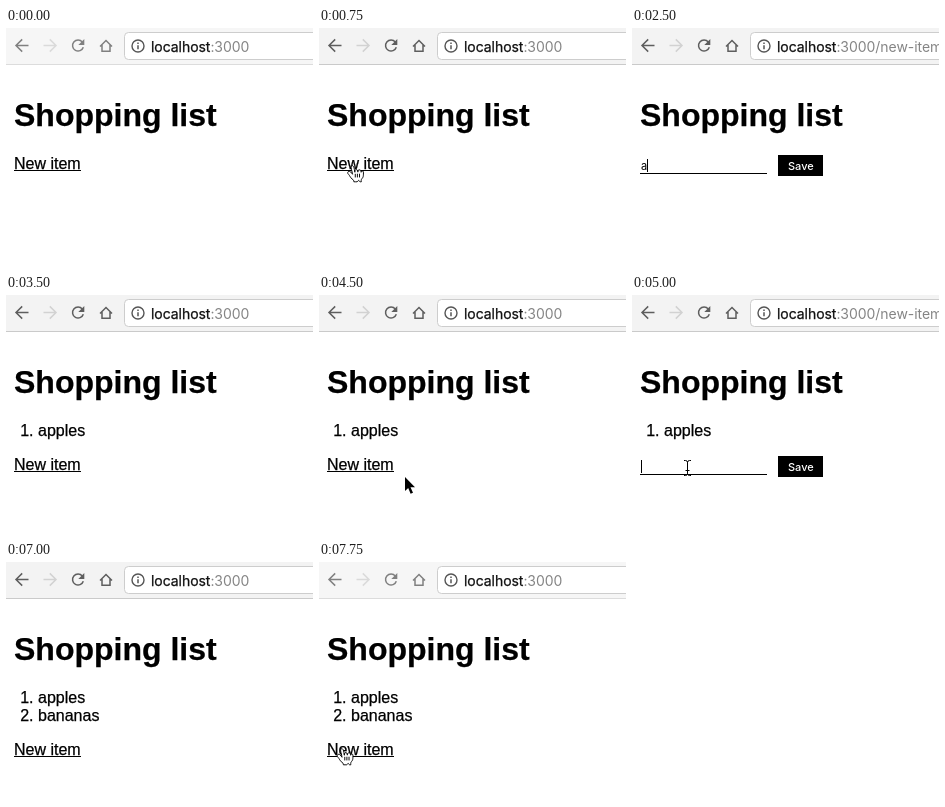
Write an HTML page that moves like this. It is 307 px wide and 239 px high and loops after 8000 ms.

```html
<!DOCTYPE html>
<html lang="en">
<head>
<meta charset="utf-8">
<title>Shopping list</title>
<style>
  html, body { margin: 0; width: 100%; height: 100%; overflow: hidden; background: #fff; }
  svg { display: block; width: 307px; height: 239px; }
  /* the thin stroke gives the heavier look of smoothed text */
  text { font: 16px "Liberation Sans", Arial, sans-serif; white-space: pre; fill: #000; stroke: #000; stroke-width: .25px; }
  .title { font-weight: bold; font-size: 32px; }
  .ui { font: 11px Inter, Roboto, sans-serif; stroke: none; }
  .save { font-weight: 500; fill: #fff; }
  .url { font: 14px Inter, Roboto, sans-serif; letter-spacing: -.05px; fill: #111; stroke: #111; }
  .url .rest { fill: #858585; stroke: none; }
  .bar { fill: #f3f3f3; }
  .edge { fill: #cacaca; }
  .icon { fill: none; stroke: #5e5e5e; stroke-width: 1.5; }
  .icon .solid { fill: #5e5e5e; stroke: none; }
  .icon.off { stroke: #d2d2d2; }
  .idle .bar { fill: #f6f6f6; }
  .idle .edge { fill: #dcdcdc; }
  .idle .icon { stroke: #808080; }
  .idle .icon .solid { fill: #808080; }
  .idle .icon.off { stroke: #dadada; }
  .hide { display: none; }
</style>
</head>
<body>
<svg id="stage" viewBox="0 0 307 239">
  <rect width="307" height="239" fill="#fff"/>

  <rect class="bar" width="307" height="36"/>
  <rect class="edge" y="36" width="307" height="1"/>
  <path class="icon" d="M22.5 17.5H10M16.2 11.4L10 17.5l6.2 6.1"/>
  <path class="icon off" d="M37.5 17.5H50M43.8 11.4L50 17.5l-6.2 6.1"/>
  <g class="icon">
    <path d="M76.3 14A5.5 5.5 0 1 0 77.3 19.2"/>
    <path class="solid" d="M78.3 11v6h-6z"/>
  </g>
  <path class="icon" d="M94 18.5L100 12.5l6 6M96 17v6.3h8V17"/>
  <rect x="118.5" y="4.5" width="200" height="27" rx="4" fill="#fff" stroke="#cdcdcd"/>
  <circle cx="132" cy="18" r="6" fill="none" stroke="#555" stroke-width="1.4"/>
  <path d="M132 17.2v4M132 14.5v1.5" stroke="#555" stroke-width="1.5"/>
  <text class="url" x="145" y="23.5">localhost<tspan class="rest" id="path">:3000</tspan></text>

  <text class="title" x="8" y="98">Shopping list</text>
  <g id="list"></g>

  <g id="foot">
    <g id="link">
      <text x="8" y="141">New item</text>
      <rect x="8" y="142" width="67" height="1"/>
    </g>
    <g id="form">
      <rect x="8" y="145" width="127" height="1"/>
      <text class="ui" id="typed" x="9" y="142"></text>
      <rect id="caret" y="131" width="1" height="13"/>
      <rect x="146" y="127" width="45" height="21"/>
      <text class="ui save" x="156" y="142">Save</text>
    </g>
  </g>

  <!-- each pointer is drawn around its hot spot -->
  <g id="arrow">
    <path d="M0 0V14L3.2 11 5.6 16.8 8 15.8 5.5 10.2H10Z" stroke="#fff" stroke-width="1.6" paint-order="stroke"/>
  </g>
  <g id="beam">
    <path fill="none" stroke="#000" d="M-3.5-7.5h1.5q2 0 2 2v11q0 2-2 2h-1.5M3.5-7.5H2q-2 0-2 2v11q0 2 2 2h1.5M-2 2.5H2"/>
  </g>
  <g id="hand">
    <g transform="scale(1.06) translate(-12.5 -8)" stroke="#000" stroke-width=".9" stroke-linejoin="round">
      <path fill="#fff" d="m11.3 20.4c-.3-.4-.6-1.1-1.2-2-.3-.5-1.2-1.5-1.5-1.9-.2-.4-.2-.6-.1-1 .1-.6.7-1.1 1.4-1.1.5 0 1 .4 1.4.7l1.1 1.3.6.8c-.1-.5-.2-1.3-.4-2.1l-.6-2.4-.3-1.5c-.1-.5-.1-1.4.3-1.8.3-.3.9-.4 1.3-.2.5.3.8 1 .9 1.3.2.5.4 1.2.5 2l.5 2.8c0-.4-.1-1.1 0-1.5.1-.3.3-.7.7-.8.3-.1.6-.1.9-.1.3.1.6.3.8.5.4.6.4 1.9.4 1.8.1-.4.1-1.2.3-1.6.1-.2.5-.4.7-.5h1c.2 0 .6.3.7.5.2.3.3 1.3.4 1.7 0 .1.1-.4.3-.7.4-.6 1.8-.8 1.9.6v1.9c0 .5-.1 1.6-.2 2.1-.1.3-.3 1-.6 1.4 0 0-1.1 1.2-1.2 1.8-.1.6-.1.6-.1 1l.1.9s-.8.1-1.2 0c-.4-.1-.9-.8-1-1.1-.2-.3-.5-.3-.7 0-.2.4-.7 1.1-1.1 1.1-.7.1-2.1 0-3.1 0 0 0 .2-1-.2-1.4z"/>
      <path d="M19.6 16.7v3.5M17.6 16.7v3.5M15.6 16.8v3.4"/>
    </g>
  </g>
</svg>
<script>
const $ = id => document.getElementById(id);
const LOOP = 8000, ROW = 18;
const HOME = ':3000', NEW = ':3000/new-item';

// Each step lists only what changes at its time (ms).
const steps = [
  [0, { idle: true, path: HOME, items: [], form: false, typed: '', caret: false, pointer: null }],
  [250, { pointer: ['arrow', 191, 102] }],
  [500, { pointer: ['hand', 34, 135.5] }],
  [750, { idle: false, pointer: ['hand', 33, 136.5] }],
  [1000, { pointer: ['hand', 36.5, 132.5] }],
  [1250, { path: NEW }],
  [1500, { form: true, caret: true, pointer: ['beam', 37.5, 132] }],
  [1750, { pointer: null }],
  [2000, { caret: false }],
  [2500, { typed: 'a', caret: true }],
  [2750, { typed: 'ap' }],
  [3000, { typed: 'appl' }],
  [3250, { typed: 'apples' }],
  [3500, { path: HOME, items: ['apples'], form: false, typed: '' }],
  [4500, { pointer: ['arrow', 86, 182] }],
  [4750, { pointer: ['hand', 55.5, 173] }],
  [5000, { path: NEW, form: true, caret: true, pointer: ['beam', 55.5, 173] }],
  [5500, { caret: false }],
  [6000, { typed: 'ba', caret: true, pointer: null }],
  [6250, { typed: 'bana' }],
  [6500, { typed: 'banana' }],
  [6750, { typed: 'bananas' }],
  [7000, { path: HOME, items: ['apples', 'bananas'], form: false, typed: '' }],
  [7500, { idle: true, pointer: ['hand', 22, 178] }],
  [7750, { pointer: ['hand', 22.5, 185.5] }]
];

const show = (id, on) => $(id).classList.toggle('hide', !on);

function render(s) {
  $('stage').classList.toggle('idle', s.idle);
  $('path').textContent = s.path;
  $('list').innerHTML = s.items.map((name, i) => {
    const y = 141 + i * ROW;
    return `<text x="14.2" y="${y}">${i + 1}.</text><text x="32" y="${y}">${name}</text>`;
  }).join('');

  const n = s.items.length;
  $('foot').setAttribute('transform', `translate(0 ${n ? 16 + n * ROW : 0})`);
  show('link', !s.form);
  show('form', s.form);
  show('caret', s.caret);
  $('typed').textContent = s.typed;
  const width = s.typed ? $('typed').getComputedTextLength() : 0;
  $('caret').setAttribute('x', Math.round(9 + width));

  for (const id of ['arrow', 'beam', 'hand']) {
    const on = !!s.pointer && s.pointer[0] === id;
    show(id, on);
    if (on) $(id).setAttribute('transform', `translate(${s.pointer[1]} ${s.pointer[2]})`);
  }
}

const start = performance.now();
let current = -1;

function tick() {
  const t = (performance.now() - start) % LOOP;
  const index = steps.filter(([at]) => at <= t).length - 1;
  if (index !== current) {
    current = index;
    render(Object.assign({}, ...steps.slice(0, index + 1).map(step => step[1])));
  }
  requestAnimationFrame(tick);
}
tick();
</script>
</body>
</html>
```
